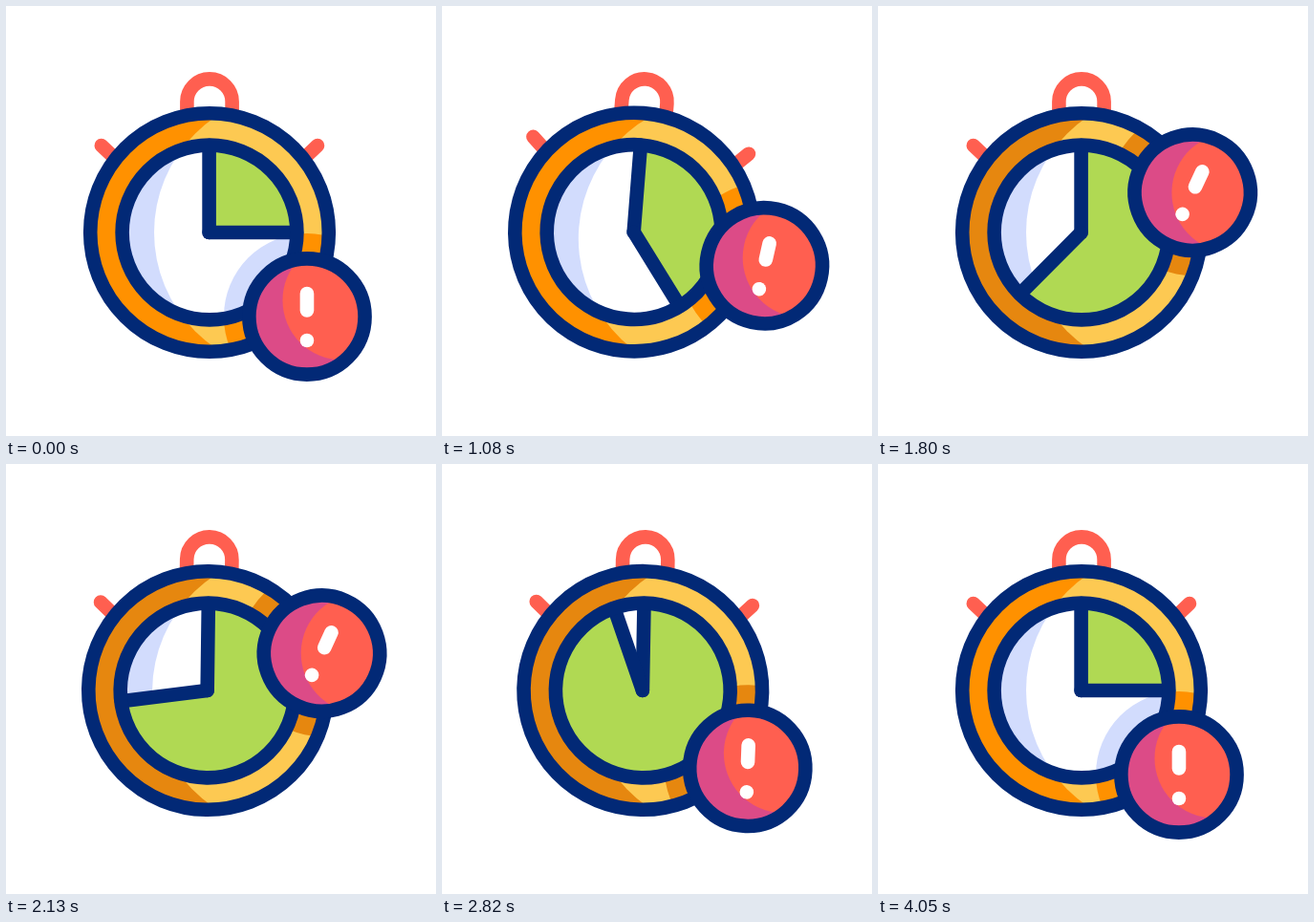
Recreate the animation shown at these times as an HTML page with a canvas. Size 450 by 450 pixels, loop 4.23 s.

```html
<!DOCTYPE html>
<html lang="en">
<head>
<meta charset="utf-8">
<title>Stopwatch alert</title>
<style>
  html, body { margin: 0; width: 100%; height: 100%; overflow: hidden; background: #fff; }
  canvas { display: block; width: 450px; height: 450px; }
</style>
</head>
<body>
<canvas id="stage"></canvas>
<script>
const LOOP = 4230, STEP = 30, SIZE = 450, TAU = Math.PI * 2, DEG = Math.PI / 180;
const NAVY = '#022976', ORANGE = '#ff9100', AMBER = '#e6870f', YELLOW = '#fdc952',
      LILAC = '#d2dcfd', GREEN = '#b0d953', RED = '#ff5f50', PINK = '#dc4b87', WHITE = '#fff';
const LINE = 14.6;
const WATCH = { x: 213, y: 237 }, PIVOT = { x: 213, y: 86 };

const canvas = document.getElementById('stage');
const ctx = canvas.getContext('2d');
const ratio = window.devicePixelRatio || 1;
canvas.width = canvas.height = SIZE * ratio;

// Sine ease from 0 to 1 between two times
function ease(from, to, t) {
  const u = Math.min(1, Math.max(0, (t - from) / (to - from)));
  return (1 - Math.cos(Math.PI * u)) / 2;
}

function turn(p, about, angle) {
  const x = p.x - about.x, y = p.y - about.y, c = Math.cos(angle), s = Math.sin(angle);
  return { x: about.x + x * c - y * s, y: about.y + x * s + y * c };
}

function disc(x, y, r, color) {
  ctx.beginPath();
  ctx.arc(x, y, r, 0, TAU);
  ctx.fillStyle = color;
  ctx.fill();
}

function ring(x, y, r, color) {
  ctx.beginPath();
  ctx.arc(x, y, r, 0, TAU);
  ctx.strokeStyle = color;
  ctx.stroke();
}

function line(x1, y1, x2, y2, color) {
  ctx.beginPath();
  ctx.moveTo(x1, y1);
  ctx.lineTo(x2, y2);
  ctx.strokeStyle = color;
  ctx.stroke();
}

function clipDisc(x, y, r) {
  ctx.beginPath();
  ctx.arc(x, y, r, 0, TAU);
  ctx.clip();
}

function pose(t) {
  const m = t < 1800 ? t : 3600 - t;   // the way back mirrors the way out
  const swing = ease(600, 1200, m) - ease(1230, 1550, m);
  const lift = ease(600, 1550, m);
  const tilt = 5 * DEG * swing;
  const orbit = (40.8 - 60.6 * lift) * DEG;
  const reach = 134.7 - 11.2 * lift + 13 * swing;
  const spot = { x: WATCH.x + reach * Math.cos(orbit), y: WATCH.y + reach * Math.sin(orbit) };
  const sweep = 90 + 270 * Math.min(1, Math.max(0, (t - 600) / 2400)) - 270 * ease(3600, 4050, t);
  return {
    tilt,
    badge: turn(spot, PIVOT, tilt),
    roll: 25 * DEG * lift,
    hand: sweep * DEG,
    rim: t >= 1400 && t < 3630 ? AMBER : ORANGE
  };
}

function drawCrown() {
  ctx.beginPath();
  ctx.moveTo(189.4, 118);
  ctx.lineTo(189.4, 100);
  ctx.arc(213, 100, 23.6, Math.PI, TAU);
  ctx.lineTo(236.6, 118);
  ctx.strokeStyle = RED;
  ctx.stroke();
  line(99.8, 146, 122, 167, RED);
  line(326, 146, 304, 167, RED);
}

// A shaded disc: base tone, lit area, then the shadow cast by the badge
function drawLayer(r, base, lit, shadow) {
  const { x, y } = WATCH;
  ctx.save();
  clipDisc(x, y, r);
  disc(x, y, r, base);
  disc(301, 237, 146, lit);
  disc(shadow.x, shadow.y, 87, base);
  ctx.restore();
}

function drawWatch(p) {
  const { x, y } = WATCH;
  const shadow = turn(p.badge, PIVOT, -p.tilt);
  ctx.save();
  ctx.translate(PIVOT.x, PIVOT.y);
  ctx.rotate(p.tilt);
  ctx.translate(-PIVOT.x, -PIVOT.y);

  drawCrown();
  drawLayer(125, p.rim, YELLOW, shadow);
  drawLayer(91, LILAC, WHITE, shadow);

  ctx.beginPath();
  ctx.moveTo(x, y);
  ctx.arc(x, y, 91, -Math.PI / 2, p.hand - Math.PI / 2);
  ctx.closePath();
  ctx.fillStyle = GREEN;
  ctx.fill();

  line(x - 0.4, y, x - 0.4, y - 91, NAVY);
  line(x - 0.4, y, x + 91 * Math.sin(p.hand), y - 91 * Math.cos(p.hand), NAVY);
  ring(x, y, 91.4, NAVY);
  ring(x, y, 124.8, NAVY);
  ctx.restore();
}

function drawBadge(p) {
  ctx.save();
  ctx.translate(p.badge.x, p.badge.y);
  ctx.rotate(p.roll);
  ctx.save();
  clipDisc(0, 0, 61);
  disc(0, 0, 61, PINK);
  disc(37, -17, 62.5, RED);
  ctx.restore();
  ring(0, 0, 60.6, NAVY);
  line(0, -24, 0, -6.5, WHITE);
  disc(0, 25, 7.3, WHITE);
  ctx.restore();
}

function draw(t) {
  const p = pose(t);
  ctx.setTransform(ratio, 0, 0, ratio, 0, 0);
  ctx.fillStyle = WHITE;
  ctx.fillRect(0, 0, SIZE, SIZE);
  ctx.lineWidth = LINE;
  ctx.lineCap = 'round';
  drawWatch(p);
  drawBadge(p);
}

const start = performance.now();
function tick() {
  const t = (performance.now() - start) % LOOP;
  draw(Math.floor(t / STEP) * STEP);
  requestAnimationFrame(tick);
}
tick();
</script>
</body>
</html>
```
